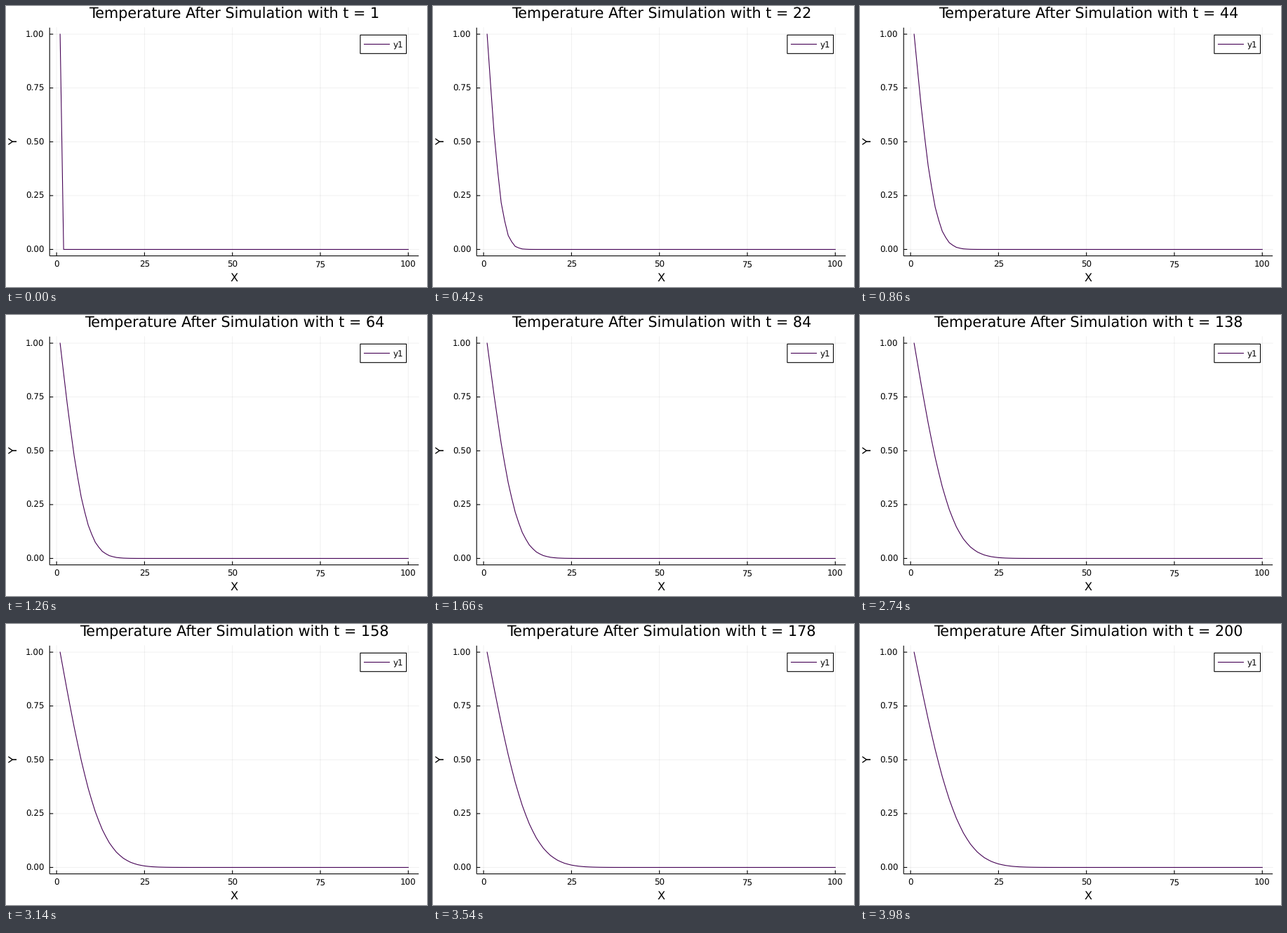
Write a matplotlib script that moves like this. It is 600 px wide and 400 px high and loops after 4000 ms.

```python
import numpy as np
import matplotlib.pyplot as plt
from matplotlib.animation import FuncAnimation
from matplotlib.patches import Rectangle

W, H, DPI = 600, 400, 100
PT = 72 / DPI  # points per pixel
FRAMES, INTERVAL = 200, 20
NODES, ALPHA = 100, 0.5
PURPLE = "#440154"
LEFT, RIGHT, TOP, BOTTOM = 62.2, 588.2, 30.8, 355.7
SMALL, MEDIUM, LARGE = 11.84, 16.28, 20.72

plt.rcParams["font.family"] = "DejaVu Sans"
plt.rcParams["text.hinting"] = "none"
plt.rcParams["path.simplify"] = False
plt.rcParams["path.snap"] = False


def px(x):
    return 72.1 + 5.012 * np.asarray(x)


def py(y):
    return 346.5 - 306.4 * np.asarray(y)


def simulate():
    """DuFort-Frankel heat diffusion along a rod with a hot left end."""
    u = np.zeros(NODES)
    u[0] = 1
    prev, states = u, [u]
    for _ in range(FRAMES - 1):
        new = u.copy()
        new[1:-1] = (ALPHA * (u[2:] + u[:-2])
                     + (1 - ALPHA) * prev[1:-1]) / (1 + ALPHA)
        prev, u = u, new
        states.append(u)
    return states


fig = plt.figure(figsize=(W / DPI, H / DPI), dpi=DPI, facecolor="white")
ax = fig.add_axes([0, 0, 1, 1])
ax.set_xlim(0, W)
ax.set_ylim(H, 0)
ax.axis("off")


def line(xs, ys, color="black", width=1.1, **kw):
    return ax.plot(xs, ys, color=color, lw=width * PT, **kw)[0]


def label(x, y, text, size, ha="center", **kw):
    return ax.text(x, y, text, fontsize=size * PT, ha=ha, va="baseline",
                   color="black", **kw)


GRID = dict(alpha=0.06, width=1, zorder=1)
AXIS = dict(solid_capstyle="butt", zorder=2)

for v in (0, 25, 50, 75, 100):
    x = px(v)
    line([x, x], [TOP, BOTTOM], **GRID)
    line([x, x], [BOTTOM, BOTTOM - 5], **AXIS)
    label(x, 371.5, str(v), SMALL)

for v in (0, 0.25, 0.5, 0.75, 1):
    y = py(v)
    line([LEFT, RIGHT], [y, y], **GRID)
    line([LEFT, LEFT + 5], [y, y], **AXIS)
    label(54.2, y + 4.3, f"{v:.2f}", SMALL, ha="right")

line([LEFT, LEFT], [TOP, BOTTOM], **AXIS)
line([LEFT, RIGHT], [BOTTOM, BOTTOM], **AXIS)
label(325.2, 392, "X", MEDIUM)
label(16, 193.2, "Y", MEDIUM, rotation=90, rotation_mode="anchor")
title = label(325.5, 18, "", LARGE)

nodes = px(np.arange(1, NODES + 1))
curve = line(nodes, nodes, PURPLE, zorder=3)

ax.add_patch(Rectangle((504.9, 41.3), 65.7, 26.4, facecolor="white",
                       edgecolor="black", lw=1.1 * PT, zorder=4))
line([510.5, 546.5], [54.4, 54.4], PURPLE, zorder=5)
label(551.3, 59, "y1", SMALL, ha="left", zorder=5)

states = simulate()


def update(i):
    curve.set_ydata(py(states[i]))
    title.set_text(f"Temperature After Simulation with t = {i + 1}")
    return curve, title


anim = FuncAnimation(fig, update, frames=FRAMES, interval=INTERVAL,
                     repeat=True, repeat_delay=0, blit=False)
plt.show()
```
